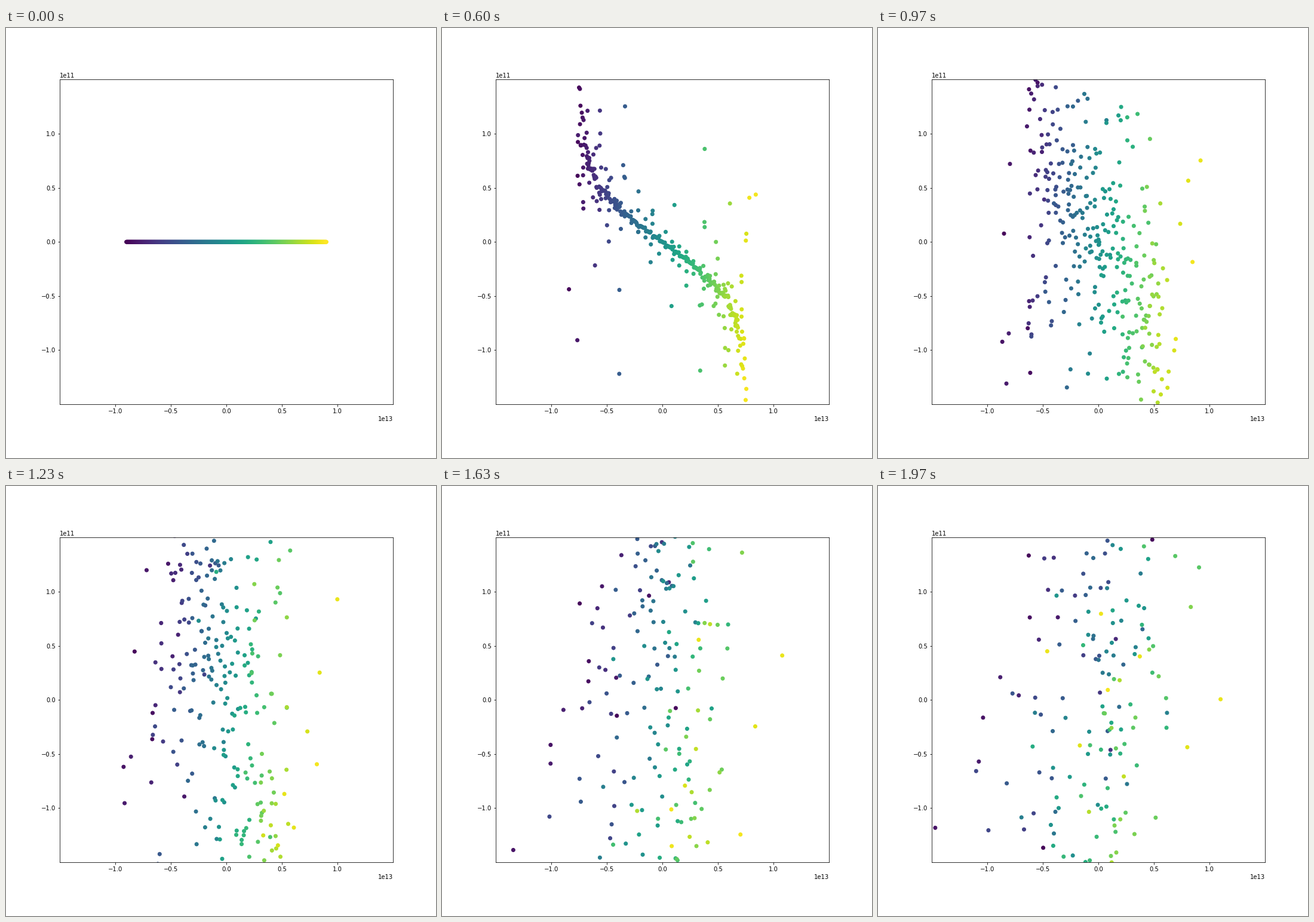
A matplotlib script that plays this animation: 720 by 720 pixels, repeating every 2.01 s.

```python
import numpy as np
import matplotlib.pyplot as plt
from matplotlib.animation import FuncAnimation

FRAMES = 60
LOOP_MS = 2010
COUNT = 500
GM = 6.674e-11 * 1e30   # pull of one body
DT = 1.0


def pull(x):
    """Acceleration on a line where attraction falls off as 1/r."""
    gap = x[None, :] - x[:, None]
    np.fill_diagonal(gap, np.inf)
    gap[gap == 0] = np.inf
    return GM * (1 / gap).sum(axis=1)


def simulate():
    """Phase-space states (position, velocity) of the collapsing line."""
    x = np.linspace(-9e12, 9e12, COUNT)
    v = np.zeros(COUNT)
    states = [np.column_stack([x, v])]
    for _ in range(FRAMES - 1):
        v = v + pull(x) * DT
        x = x + v * DT
        states.append(np.column_stack([x, v]))
    return states


states = simulate()

plt.rcParams["font.family"] = "DejaVu Sans"
fig, ax = plt.subplots(figsize=(10, 10), dpi=72)
fig.subplots_adjust(left=0.125, right=0.9, bottom=0.125, top=0.88)
dots = ax.scatter(*states[0].T, c=states[0][:, 0], cmap="viridis")

steps = np.arange(-2, 3) * 0.5
ax.set_xticks(steps * 1e13)
ax.set_yticks(steps * 1e11)
ax.set_xlim(-1.5e13, 1.5e13)
ax.set_ylim(-1.5e11, 1.5e11)


def draw(i):
    dots.set_offsets(states[i])
    return (dots,)


anim = FuncAnimation(fig, draw, frames=FRAMES, interval=LOOP_MS / FRAMES,
                     repeat=True, repeat_delay=0)
plt.show()
```
